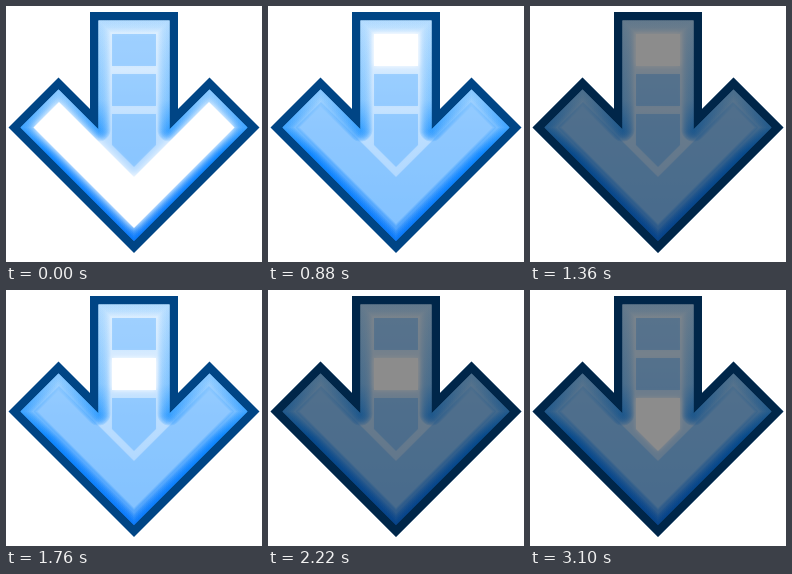
An HTML page with a canvas that plays this animation: 256 px wide and 256 px high, repeating every 3520 ms.

```html
<!DOCTYPE html>
<html>
<head>
<meta charset="utf-8">
<style>
html, body { margin: 0; width: 100%; height: 100%; overflow: hidden; background: #fff; }
canvas { display: block; width: 256px; height: 256px; }
</style>
</head>
<body>
<canvas id="stage" width="256" height="256"></canvas>
<script>
const ctx = document.getElementById('stage').getContext('2d');
const LOOP = 3520, PHASE = 880, HOLD = 120, STEPS = 10, DIM = 0.45;
const MID = 128, WING_Y = 121.5;

// Each point is [distance from the middle, y]; the left half is mirrored
function mirrored(points) {
  const path = new Path2D();
  points.forEach(([x, y]) => path.lineTo(MID + x, y));
  points.slice().reverse().forEach(([x, y]) => path.lineTo(MID - x, y));
  path.closePath();
  return path;
}

// All slanted sides run at 45 degrees
function arrow(inset) {
  const slant = inset * Math.SQRT2;
  const stem = 44 - inset, wing = 125.5 - slant, apex = 75.5, apexY = 71.5 + slant;
  return mirrored([
    [stem, 6 + inset], [stem, apexY + apex - stem],
    [apex, apexY], [wing, WING_Y], [0, WING_Y + wing]
  ]);
}

function cell(i) {
  const y = 28 + 40 * i;
  return mirrored(i < 2 ? [[22, y], [22, y + 32]] : [[22, y], [22, y + 31], [0, y + 53]]);
}

const outer = arrow(0), inner = arrow(8.5);
const chevron = mirrored([[0, 171], [75, 96], [100.5, WING_Y], [0, WING_Y + 100.5]]);
// Lit in this order, one per phase
const parts = [chevron, cell(0), cell(1), cell(2)];

function vertical(...stops) {
  const g = ctx.createLinearGradient(0, 14, 0, 236);
  stops.forEach(([at, color]) => g.addColorStop(at, color));
  return g;
}

const base = vertical([0, '#e2f1ff'], [0.3, '#d0e8ff'], [0.5, '#bcdeff'], [1, '#a4d2ff']);
const edge = vertical([0, '#b0daff'], [0.36, '#7cc2ff'], [0.5, '#2c9aff'], [0.6, '#0080ff'], [1, '#0074f8']);

function fillSoft(path, color, blur, glow) {
  ctx.save();
  ctx.shadowColor = glow;
  ctx.shadowBlur = blur;
  ctx.fillStyle = color;
  ctx.fill(path);
  ctx.restore();
}

function drawArrow(lit) {
  ctx.fillStyle = '#004585';
  ctx.fill(outer);
  ctx.save();
  ctx.clip(inner);
  ctx.fillStyle = base;
  ctx.fill(inner);

  parts.forEach((part, i) => {
    if (i !== lit) fillSoft(part, 'rgba(92,174,255,.42)', 2, 'rgba(100,178,255,.3)');
  });

  // Layered strokes make the inner glow, densest at the rim
  ctx.strokeStyle = edge;
  ctx.lineJoin = 'round';
  ctx.globalAlpha = 0.17;
  for (let k = 1; k <= 14; k++) {
    ctx.lineWidth = 2 + 22 * (k / 14) ** 1.4;
    ctx.stroke(inner);
  }
  ctx.globalAlpha = 1;

  fillSoft(parts[lit], '#fff', lit ? 5 : 8, '#fff');
  ctx.restore();
}

function fade(t, phase) {
  if (t < HOLD) return 0;
  const gap = phase < 2 ? 40 : 340 / 9;
  return Math.min(STEPS, Math.floor((t - HOLD) / gap + 0.001) + 1) / STEPS;
}

const start = performance.now();

function draw() {
  const t = Math.max(0, performance.now() - start) % LOOP;
  const phase = Math.floor(t / PHASE);
  ctx.fillStyle = '#fff';
  ctx.fillRect(0, 0, 256, 256);
  drawArrow(phase);
  ctx.fillStyle = `rgba(0,0,0,${DIM * fade(t % PHASE, phase)})`;
  ctx.fill(outer);
  requestAnimationFrame(draw);
}
draw();
</script>
</body>
</html>
```
